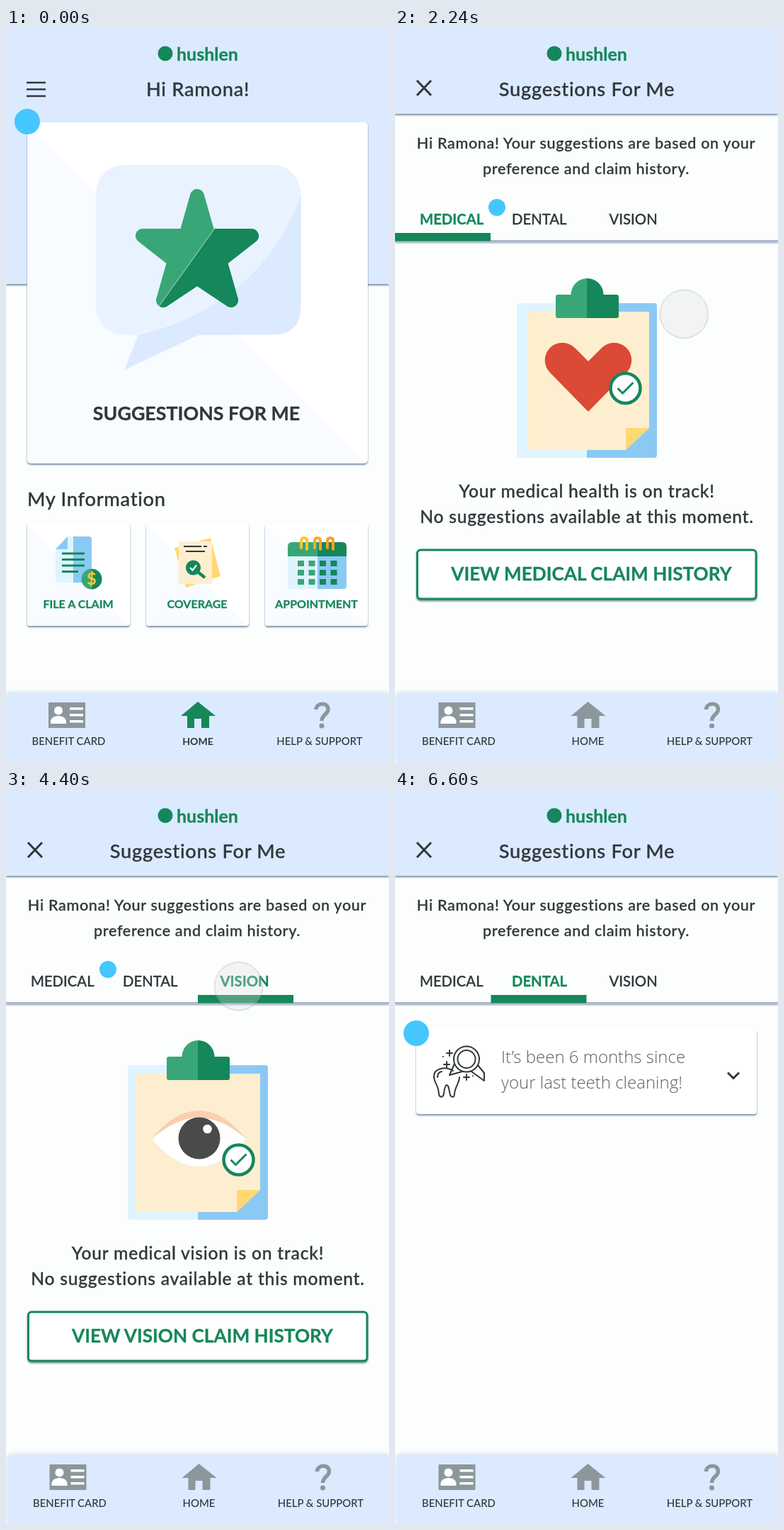
Recreate the animation shown at these times as an HTML page. Size 541x1035 px, loop 7680 ms.

```html
<!DOCTYPE html>
<html lang="en">
<head>
<meta charset="utf-8">
<title>Health benefits app</title>
<style>
html, body { margin: 0; width: 100%; height: 100%; overflow: hidden; background: #fbfefd; }
svg { display: block; width: 100vw; height: 100vh; }
text {
  font: 500 27.3px Lato, "Open Sans", sans-serif;
  fill: currentColor; stroke: currentColor; stroke-width: .3; stroke-linejoin: round;
  letter-spacing: .025em;
}
svg { color: #30373b; }
.mid { text-anchor: middle; }
.bold { font-weight: 700; letter-spacing: 0; }
.green { color: #15875a; }
.title { font-size: 26.8px; }
.label { font-size: 16px; }
.nav { font-size: 14.9px; letter-spacing: 0; stroke-width: 0; }
.intro { font-size: 21.6px; letter-spacing: .03em; }
.body { font-size: 24.7px; letter-spacing: .03em; }
.tab { font-size: 20.3px; letter-spacing: 0; }
.button { font-size: 26.2px; }
.light { font: 300 24px "Open Sans", sans-serif; letter-spacing: 0; color: #5c6063; stroke-width: 0; }
.line { fill: none; stroke: currentColor; stroke-width: 3; }
.round { stroke-linecap: round; stroke-linejoin: round; }
.shadow { filter: drop-shadow(0 2px 1.2px #3f557da6); }
.sky { fill: #dbeaff; }
.dot { fill: #45c6ff; }

.screen, #cursor, #disc { animation: 7680ms infinite; }
#medical { animation-name: to-medical; }
#vision { animation-name: to-vision; }
#dental { animation-name: to-dental; }
@keyframes to-medical {
  0%, 18.62% { opacity: 0; animation-timing-function: ease-out; }
  23.18%, 100% { opacity: 1; }
}
@keyframes to-vision {
  0%, 45.96% { opacity: 0; animation-timing-function: ease-out; }
  50.52%, 100% { opacity: 1; }
}
@keyframes to-dental {
  0%, 69.4% { opacity: 0; animation-timing-function: ease-out; }
  73.96%, 100% { opacity: 1; }
}
#cursor { animation-name: move; }
@keyframes move {
  0%, 2.8% { transform: translate(576px, -20px); animation-timing-function: cubic-bezier(.3, .5, .65, 1); }
  12.76%, 13.02% { transform: translate(415px, 408px); }
  14.32%, 18.62% { transform: translate(412px, 407.5px); }
  23.18%, 28.91% { transform: translate(411px, 408px); animation-timing-function: cubic-bezier(.3, .5, .65, 1); }
  41.67%, 45.96% { transform: translate(332px, 275px); }
  50.52%, 57.03% { transform: translate(334px, 277px); animation-timing-function: cubic-bezier(.4, .25, .6, 1); }
  62.24%, 69.4% { transform: translate(183.5px, 270.5px); }
  73.96%, 78.78% { transform: translate(182px, 270px); animation-timing-function: ease-in; }
  81.5% { transform: translate(300px, 263px); animation-timing-function: cubic-bezier(.3, .4, .7, 1); }
  85.94%, 100% { transform: translate(577px, 303px); }
}
#disc { fill: #dcdcdc; stroke: #8a8f92; animation-name: press; }
@keyframes press {
  0%, 13.02%, 21%, 39.4%, 48.4%, 61%, 72%, 100% { fill-opacity: .3; stroke-opacity: .45; transform: none; }
  14.32%, 18.62%, 41.2%, 45.96%, 62.24%, 69.4% { fill-opacity: .65; stroke-opacity: .75; transform: scale(.96); }
}
</style>
</head>
<body>
<svg viewBox="0 0 541 1035">
<defs>
  <linearGradient id="blues">
    <stop offset=".5" stop-color="#dff4fe"/><stop offset=".5" stop-color="#8bc9f5"/>
  </linearGradient>
  <linearGradient id="greens">
    <stop offset=".5" stop-color="#39a678"/><stop offset=".5" stop-color="#15875a"/>
  </linearGradient>
  <clipPath id="half"><path d="M296 260V281L217 391V420H380V260Z"/></clipPath>

  <path id="star" stroke-width="20" stroke-linejoin="round"
    d="M270 237L286 293H347L302 328 318 384 270 352 222 384 238 328 193 293H254Z"/>

  <g id="tile">
    <rect class="shadow" width="145" height="144" rx="4" fill="#fff"/>
    <path d="M0 2L143 144H4Q0 144 0 140Z" fill="#f8fbff"/>
  </g>

  <path id="house" d="M271 950L296 970H287V987H276V974H266V987H256V970H247Z"/>

  <g id="nav">
    <path class="sky" d="M0 1035V944Q0 937 7 937H534Q541 937 541 944V1035Z"
      style="filter:drop-shadow(0 -1px 3px #5f719030)"/>
    <g fill="#8c979c">
      <rect x="60" y="951" width="52" height="36"/>
      <g fill="#fff">
        <circle cx="74" cy="962.5" r="6"/>
        <path d="M63 981V977Q65 970 74 970T85 977V981Z"/>
        <path d="M90 958H109V961.5H90ZM90 967H109V970.5H90ZM90 976H109V979.5H90Z"/>
      </g>
      <circle cx="446" cy="984" r="3.6"/>
    </g>
    <path class="line" d="M438 961C438 951 455 950 455 961C455 968 446 968 446 977"
      style="stroke:#8c979c;stroke-width:5.4"/>
    <text class="nav mid" x="88.5" y="1011">BENEFIT CARD</text>
    <text class="nav mid" x="443" y="1011">HELP &amp; SUPPORT</text>
  </g>

  <g id="base">
    <rect width="541" height="1035" fill="#fbfefd"/>
    <rect class="sky shadow" width="541" height="121"/>
    <path class="line" d="M31 74L51 95M51 74L31 95"/>
    <text class="mid" x="271" y="96">Suggestions For Me</text>
    <text class="intro mid" x="270" y="170">Hi Ramona! Your suggestions are based on your</text>
    <text class="intro mid" x="270" y="206">preference and claim history.</text>
    <rect class="shadow" y="299" width="541" height="2" fill="#a9b7cd"/>
    <g transform="translate(1.5 0)">
      <use href="#nav"/>
      <use href="#house" fill="#8c979c"/>
      <text class="nav mid" x="271" y="1011">HOME</text>
    </g>
  </g>

  <g id="board">
    <rect x="172" y="388" width="198" height="218" rx="4" fill="url(#blues)"/>
    <path d="M187 400H359V564L326 595H187Z" fill="#feeed0"/>
    <path d="M326 564H359L326 595Z" fill="#ffd873"/>
    <path d="M230 376H248.500A23 23 0 0 1 294.500 376H313Q316 376 316 379V406Q316 409 313 409H230Q227 409 227 406V379Q227 376 230 376Z" fill="url(#greens)"/>
  </g>

  <g id="badge" class="green">
    <circle r="21" fill="#fff" stroke="currentColor" stroke-width="4.500"/>
    <path class="line" d="M-11 0L-4 7 11 -8"/>
  </g>

  <g id="outcome">
    <text class="body mid" x="271" y="698">No suggestions available at this moment.</text>
    <rect class="shadow" x="31.500" y="736" width="478.500" height="69" rx="4.500" fill="#fff" stroke="#15875a" stroke-width="3"/>
  </g>
</defs>

<g id="home">
  <rect width="541" height="1035" fill="#fbfefd"/>
  <rect class="sky shadow" width="541" height="361"/>
  <path class="line" d="M29 77H56M29 86.500H56M29 96H56" style="stroke-width:2.600"/>
  <text class="mid" x="271" y="96">Hi Ramona!</text>

  <rect class="shadow" x="30" y="133" width="481" height="481" rx="5" fill="#fff"/>
  <path d="M30 135L507 613H35Q30 613 30 608Z" fill="#f8fbff"/>
  <rect x="127" y="193" width="289.500" height="239.500" rx="40" fill="#e8f3ff"/>
  <path class="sky" d="M416.500 233C382 330 310 402 187 432L167 482 273 432.500H376.500Q416.500 432.500 416.500 392.500Z"/>
  <path d="M416.500 233C382 330 310 402 187 432" fill="none" stroke="#f6faff"/>
  <use href="#star" fill="#39a678" stroke="#39a678"/>
  <use href="#star" fill="#15875a" stroke="#15875a" clip-path="url(#half)"/>
  <path d="M296 281L217 391" stroke="#b6dccb"/>
  <text class="title bold mid" x="269" y="553">SUGGESTIONS FOR ME</text>

  <text x="30" y="674">My Information</text>
  <use href="#tile" x="30" y="699"/>
  <use href="#tile" x="198" y="699"/>
  <use href="#tile" x="366" y="699"/>

  <path d="M87 717H117Q121 717 121 721V782H73Q70 782 70 779V735Z" fill="url(#blues)"/>
  <path d="M70 735L87 717V735Z" fill="#8bc9f5"/>
  <path class="line green" d="M79 741H111M79 749.500H111M79 758H111M79 766.500H102"/>
  <circle cx="121" cy="777" r="14.500" fill="url(#greens)"/>
  <text class="bold mid" x="121" y="785" style="font-size:23px;color:#fdc52f">$</text>

  <path d="M238 733L289 719 303 773 254 789Z" fill="#ffd873"/>
  <rect x="244" y="724" width="47" height="60" fill="#feeed0"/>
  <path class="line" d="M251 731H276M279 731H284M254 738H281" style="stroke-width:2"/>
  <g class="green">
    <circle cx="264.500" cy="761" r="10.500" fill="currentColor"/>
    <path class="line" d="M271 767L281 775" style="stroke-width:4.500"/>
    <path class="line" d="M260 761L263.500 764.500 269 757.500" style="stroke:#fff;stroke-width:2.200"/>
  </g>

  <path d="M398 744H481V787Q481 791 477 791H402Q398 791 398 787Z" fill="url(#blues)"/>
  <path d="M398 745V731Q398 725 404 725H475Q481 725 481 731V745Z" fill="url(#greens)"/>
  <g class="line round" style="stroke-width:4">
    <path d="M417 733V723Q417 719 421 719T425 723V735" stroke="#fdc52f"/>
    <path d="M436 733V723Q436 719 440 719T444 723V735" stroke="#f9a72a"/>
    <path d="M454 733V723Q454 719 458 719T462 723V735" stroke="#f9a01f"/>
  </g>
  <path d="M416.500 751V786M432 751V786" stroke="#39a678" stroke-width="9" stroke-dasharray="8 5"/>
  <path d="M447.500 751V786M463 751V786" stroke="#15875a" stroke-width="9" stroke-dasharray="8 5"/>

  <g class="green">
    <text class="label bold mid" x="102" y="818">FILE A CLAIM</text>
    <text class="label bold mid" x="270" y="818">COVERAGE</text>
    <text class="label bold mid" x="438.500" y="818">APPOINTMENT</text>
  </g>
  <use href="#nav"/>
  <use href="#house" fill="#15875a"/>
  <text class="nav bold mid" x="271" y="1011" style="font-size:14px">HOME</text>
  <circle class="dot" cx="30" cy="132" r="18"/>
</g>

<g id="medical" class="screen">
  <use href="#base"/>
  <text class="tab bold green" x="35" y="277">MEDICAL</text>
  <text class="tab" x="165" y="277">DENTAL</text>
  <text class="tab" x="302.500" y="277">VISION</text>
  <rect y="289" width="135" height="11.500" fill="#15875a"/>
  <circle class="dot" cx="144" cy="253" r="12"/>
  <use href="#board"/>
  <path d="M273 541L219 486A24.500 24.500 0 1 1 254 451L273 470 292 451A24.500 24.500 0 1 1 327 486Z" fill="#da4a35"/>
  <use href="#badge" x="325.500" y="508"/>
  <text class="body mid" x="271" y="662">Your medical health is on track!</text>
  <use href="#outcome"/>
  <text class="button bold mid green" x="277.500" y="779">VIEW MEDICAL CLAIM HISTORY</text>
</g>

<g id="vision" class="screen">
  <use href="#base"/>
  <text class="tab" x="35" y="277">MEDICAL</text>
  <text class="tab" x="165" y="277">DENTAL</text>
  <text class="tab bold green" x="302.500" y="277">VISION</text>
  <rect x="271" y="289" width="135" height="11.500" fill="#15875a"/>
  <circle class="dot" cx="144" cy="253" r="12"/>
  <use href="#board"/>
  <rect x="183" y="400" width="5" height="195" fill="#feeed0"/>
  <path d="M206 492Q238 452 272.500 452T339 492Z" fill="#fccdb0"/>
  <path d="M206 492Q240 462 272.500 462T339 492Q306 531 272.500 531T206 492Z" fill="#fff"/>
  <circle cx="273" cy="491" r="29.500" fill="#4a4a4a"/>
  <circle cx="284.500" cy="478" r="6.300" fill="#fff"/>
  <use href="#badge" x="328.500" y="521.500"/>
  <text class="body mid" x="271" y="662">Your medical vision is on track!</text>
  <use href="#outcome"/>
  <text class="button bold mid green" x="277.500" y="779">VIEW VISION CLAIM HISTORY</text>
</g>

<g id="dental" class="screen">
  <use href="#base"/>
  <text class="tab" x="35" y="277">MEDICAL</text>
  <text class="tab bold green" x="165" y="277">DENTAL</text>
  <text class="tab" x="302.500" y="277">VISION</text>
  <rect x="135.500" y="289" width="135" height="11.500" fill="#15875a"/>
  <rect class="shadow" x="30" y="337" width="481" height="120" rx="4" fill="#fff"/>
  <g class="line round" style="stroke-width:2">
    <path d="M82 396C72 389 54 392 55 405C56 415 61 414 62 429C63 434 68 434 69 428C70 420 71 416 73 416C76 416 76 422 78 430C80 434 84 434 84 428C85 418 91 413 91 405M60 405Q60 398 66 397"/>
    <circle cx="101" cy="379.500" r="18"/>
    <circle cx="101" cy="379.500" r="12.500"/>
    <path d="M84 386L77 402 95 397M108 397L126 410V399L117 388"/>
    <path d="M77 367V375M73 371H81M73 383V391M69 387H77M101 401V409M97 405H105M68 376V376.100M110 403V403.100"/>
  </g>
  <text class="light" x="150" y="385">It’s been 6 months since</text>
  <text class="light" x="150" y="421">your last teeth cleaning!</text>
  <path class="line" d="M470 398.500L478 406.500 486 398.500"/>
  <circle class="dot" cx="30" cy="343" r="18"/>
</g>

<g class="green">
  <circle cx="225" cy="36" r="10.500" fill="currentColor"/>
  <text class="bold" x="241" y="46" style="font-size:25px">hushlen</text>
</g>
<g id="cursor"><circle id="disc" r="34"/></g>
</svg>
</body>
</html>
```
